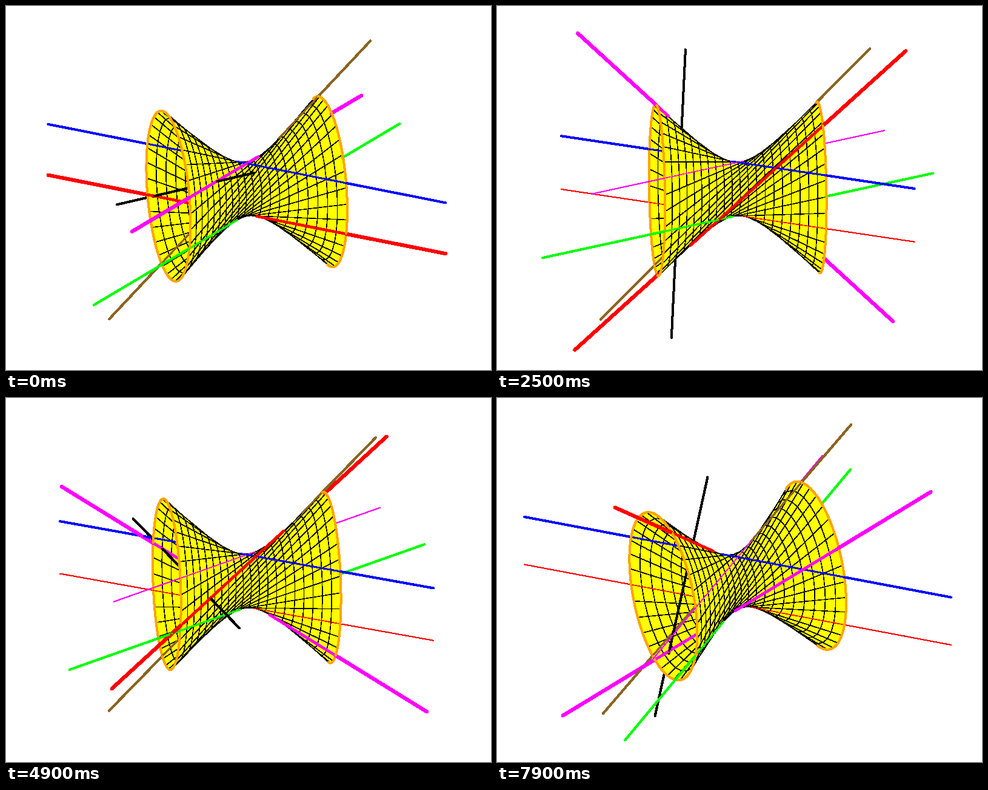
Write a matplotlib script that moves like this. It is 800 px wide and 600 px high and loops after 8000 ms.

```python
import numpy as np
import matplotlib.pyplot as plt
from matplotlib.animation import FuncAnimation
from matplotlib.collections import LineCollection, PolyCollection

FRAMES, INTERVAL = 80, 100
UNIT = 44.6                      # pixels per world unit
CENTER = np.array([397.2, 301.5])
HALF = 3.0                       # the surface y^2 + z^2 - x^2 = 1 ends at x = +-HALF
PX = 0.72                        # points per pixel at 100 dpi

BROWN, ORANGE = "#8b6522", "#ffa500"
RED, BLUE, GREEN, MAGENTA = "#ff0000", "#0000ff", "#00ff00", "#ff00ff"


def stroke(px):
    """Line width in points; hard-edged strokes cover one extra pixel."""
    return np.maximum(px - 1, 0.5) * PX


def camera(phase):
    """Rows: screen right, screen up, towards the viewer."""
    az = np.radians(15 - 10 * np.sin(phase))
    el = az + np.radians(5)
    ca, sa, ce, se = np.cos(az), np.sin(az), np.cos(el), np.sin(el)
    return np.array([[ca, sa, 0],
                     [sa * se, -ca * se, ce],
                     [-sa * ce, ca * ce, se]])


def project(cam, pts):
    xy = pts @ cam[:2].T
    return CENTER + UNIT * xy * [1, -1]


def visible(pts, view):
    """True where no part of the surface lies between point and viewer."""
    sign = np.array([-1, 1, 1])
    a = np.sum(sign * view * view)
    b = pts @ (sign * view)
    c = (pts * pts) @ sign - 1
    disc = b * b - a * c
    root = np.sqrt(np.maximum(disc, 0))
    hidden = np.zeros(len(pts), bool)
    for s in ((-b - root) / a, (-b + root) / a):
        x = pts[:, 0] + s * view[0]
        hidden |= (disc > 0) & (s > 0.08) & (np.abs(x) <= HALF)
    return ~hidden


def span(mid, direction, reach, n=160):
    t = np.linspace(-reach, reach, n + 1)[:, None]
    return np.array(mid) + t * np.array(direction)


def ring(x):
    a = np.linspace(0, 2 * np.pi, 121)
    r = np.hypot(1, x)
    return np.column_stack([np.full_like(a, x), r * np.cos(a), r * np.sin(a)])


def ruling(phase):
    """Waist point and direction of a line of the moving family."""
    c, s = np.cos(phase), np.sin(phase)
    return np.array([0, s, -c]), np.array([1, c, s])


def mesh(nx=20, na=32):
    """Quads between neighbouring rulings, cut by rings."""
    p = np.array([span(*ruling(a), HALF, nx)
                  for a in np.linspace(0, 2 * np.pi, na + 1)])
    quads = np.stack([p[:-1, :-1], p[1:, :-1], p[1:, 1:], p[:-1, 1:]], axis=2)
    return quads.reshape(-1, 4, 3)


def crossbar(phase):
    """Bar through one point of each moving line."""
    k = 0.6 * np.cos(phase)
    p, d = ruling(phase)
    q, e = ruling(phase + np.pi)
    one, two = p + (-2.2 - k) * d, q + (-2.2 + k) * e
    return span((one + two) / 2, (one - two) / 2, 2.2)


QUADS = mesh()

# points, colour, width in pixels, lies on the surface
FIXED = [
    (span([0, 0, 1], [1, 1, 0], 6), BLUE, 4, True),
    (span([0, 0, -1], [1, 1, 0], 6), RED, 2, True),
    (span([0, 0, 1], [1, -1, 0], 6), MAGENTA, 2, True),
    (span([0, 0, -1], [1, -1, 0], 8), GREEN, 4, True),
    (span([0, -1, 0], [1, 0, 1], 5), BROWN, 4, True),
    (ring(-HALF), ORANGE, 4, False),
    (ring(HALF), ORANGE, 4, False),
]

fig = plt.figure(figsize=(8, 6), dpi=100, facecolor="white")
ax = fig.add_axes([0, 0, 1, 1])
ax.set(xlim=(0, 800), ylim=(600, 0))
ax.axis("off")

surface = PolyCollection([], facecolors="#ffff00", edgecolors="black",
                         linewidths=stroke(1), antialiaseds=False, zorder=1)
lines = LineCollection([], capstyle="round", antialiaseds=False, zorder=2)
ax.add_collection(surface, autolim=False)
ax.add_collection(lines, autolim=False)


def update(i):
    phase = np.radians(3 * i)
    cam = camera(phase)
    view = cam[2]

    order = np.argsort(QUADS.mean(axis=1) @ view)
    surface.set_verts(project(cam, QUADS[order]))

    moving = [
        (span(*ruling(phase), 6), RED, 6, True),
        (span(*ruling(phase + np.pi), 6), MAGENTA, 6, True),
        (crossbar(phase), "#000000", 4, False),
    ]
    segs, widths, colors, depth = [], [], [], []
    for pts, color, width, embedded in FIXED + moving:
        mid = (pts[:-1] + pts[1:]) / 2
        seen = visible(mid, view)
        xy = project(cam, pts)
        thin = embedded & (np.abs(mid[:, 0]) < HALF)
        segs.append(np.stack([xy[:-1], xy[1:]], axis=1)[seen])
        widths.append(stroke(np.where(thin, 0.75, 1.0)[seen] * width))
        depth.append((mid @ view)[seen] + 0.01 * width)
        colors += [color] * int(seen.sum())

    order = np.argsort(np.concatenate(depth), kind="stable")
    lines.set_segments(np.concatenate(segs)[order])
    lines.set_linewidths(np.concatenate(widths)[order])
    lines.set_color([colors[j] for j in order])
    return surface, lines


anim = FuncAnimation(fig, update, frames=FRAMES, interval=INTERVAL,
                     repeat=True, repeat_delay=0, blit=False)
plt.show()
```
